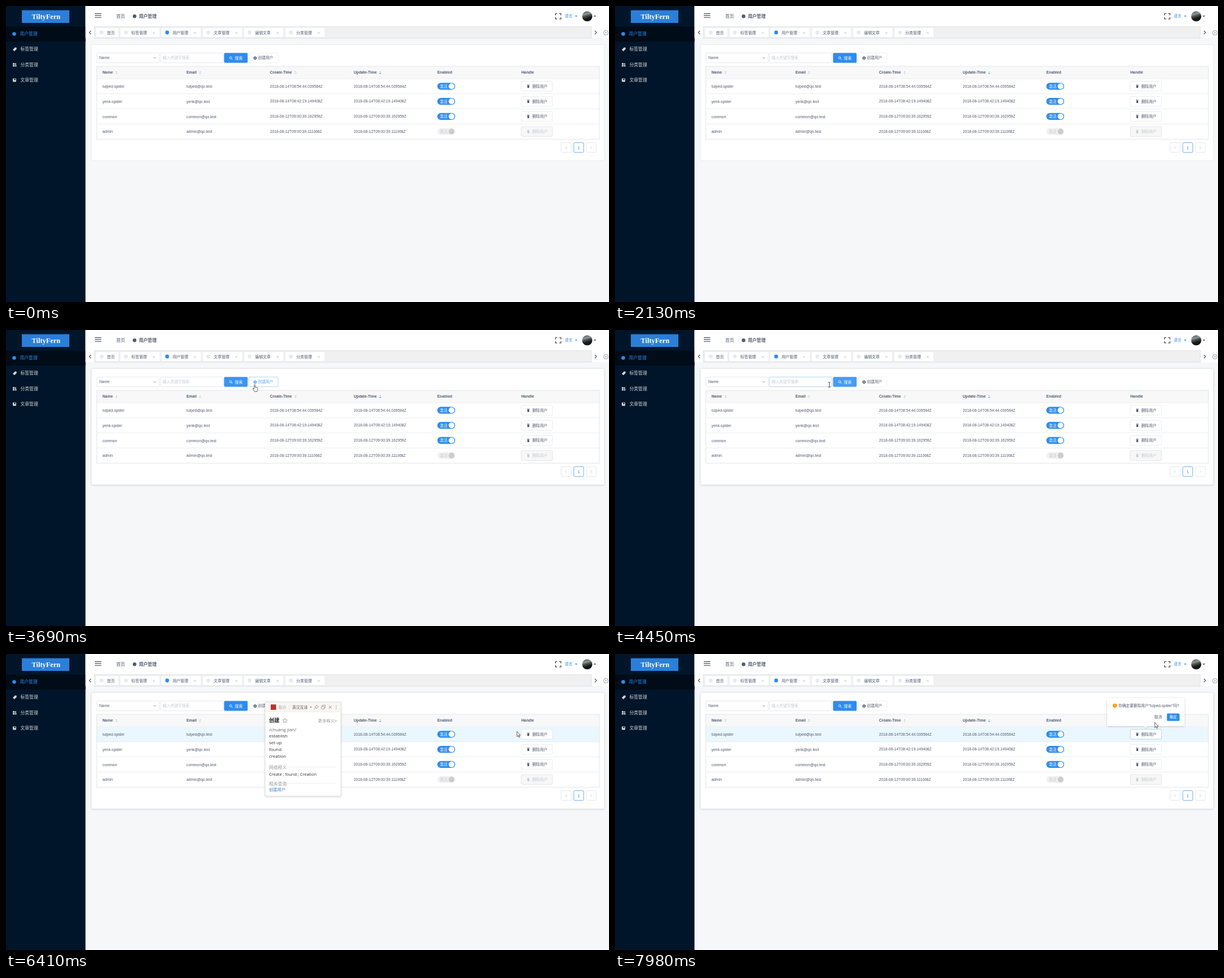
Write an HTML page that moves like this. It is 1066 px wide and 525 px high and loops after 8 s.

```html
<!DOCTYPE html>
<html lang="zh-CN">
<head>
<meta charset="utf-8">
<title>用户管理</title>
<style>
html, body { margin: 0; width: 100%; height: 100%; overflow: hidden; background: #f5f7f9; }
svg { display: block; font-family: "Liberation Sans", "Noto Sans CJK SC", "Noto Sans CJK", sans-serif; }
text { white-space: pre; }
.latin { font-family: "Open Sans", "Noto Sans CJK SC", "Noto Sans CJK", sans-serif; }
</style>
</head>
<body>
<svg id="stage" width="1066" height="525" viewBox="0 0 1066 525"></svg>
<script>
const LOOP = 8000;
const BLUE = '#2d8cf0', INK = '#515a6e', PALE = '#c5c8ce', LINE = '#e3e5e9';
const stage = document.getElementById('stage');

// Drawing helpers: text is placed by its vertical centre.
const text = (x, y, s, size = 6.75, fill = INK, more = '') =>
  `<text x="${x}" y="${y + size * .36}" font-size="${size}" fill="${fill}" ${more}>${s}</text>`;
const box = (x, y, w, h, fill, more = '') =>
  `<rect x="${x}" y="${y}" width="${w}" height="${h}" fill="${fill}" ${more}/>`;
const dot = (x, y, r, fill, more = '') => `<circle cx="${x}" cy="${y}" r="${r}" fill="${fill}" ${more}/>`;
const line = (d, color, w = .8) => `<path d="${d}" fill="none" stroke="${color}" stroke-width="${w}"/>`;
const shape = (d, fill, more = '') => `<path d="${d}" fill="${fill}" ${more}/>`;
const cross = (x, y, r, color, w = .6) =>
  line(`M${x - r} ${y - r}l${2 * r} ${2 * r}m0 ${-2 * r}l${-2 * r} ${2 * r}`, color, w);
const caret = (x, y, r, fill, dir = 1) => shape(`M${x - r} ${y}h${2 * r}l${-r} ${r * dir}z`, fill);
const frame = (x, y, w, h, color, more = '') =>
  box(x, y, w, h, '#fff', `rx="1.8" stroke="${color}" stroke-width=".7" ${more}`);
const BOLD = 'font-weight="bold"';

// Pointer moves: start, end, steps, then evenly timed way points.
const moves = [
  [70, 320, 5, 1032, 545, 808, 424],
  [550, 1100, 8, 808, 424, 640, 325, 450, 215, 340, 145, 280, 116],
  [1170, 1250, 2, 280, 116, 268, 135],
  [1570, 1800, 4, 268, 135, 190, 132, 110, 128, 35, 124, -30, 120],
  [1960, 2130, 3, -20, 20, 3, 17, 20, 6, -20, 0],
  [2590, 3060, 7, 81, 20, 380, 108],
  [3140, 3370, 4, 380, 108, 412, 106, 415, 104],
  [3440, 3760, 5, 415, 104, 430, 98, 446, 95.5],
  [3930, 3930, 1, 446, 95.5, 450, 95],
  [4160, 4450, 5, 450, 95, 379, 97],
  [4550, 4920, 6, 379, 97, 371, 96, 402, 97, 443, 96.5],
  [5010, 5170, 3, 443, 96.5, 449.5, 95.5],
  [5930, 6410, 7, 449.5, 95.5, 600, 128, 903, 137],
  [6490, 6730, 4, 903, 137, 925, 140],
  [6810, 7510, 10, 925, 140, 930, 141, 934, 138, 938, 126],
  [7910, 7980, 2, 938, 126, 954, 121]
];

function pointer(t) {
  let at = [-99, -99];
  for (const [start, end, steps, ...pts] of moves) {
    if (t < start) break;
    const k = Math.min(steps, 1 + Math.floor((t - start) / (end - start || 1) * (steps - 1) + .25));
    const legs = pts.length / 2 - 1, f = k / steps * legs;
    const i = Math.min(legs - 1, Math.floor(f)), u = f - i;
    at = [0, 1].map(a => pts[2 * i + a] * (1 - u) + pts[2 * i + 2 + a] * u);
  }
  return at;
}

const inside = ([px, py], [x, y, w, h]) => px >= x && px < x + w && py >= y && py < y + h;
// Hover strength from 0 to 1, fading over the last moments.
const lit = (t, area) => [0, 70, 140].reduce((n, d) => n + inside(pointer(t - d), area), 0) / 3;

const CARD = [151, 68.5, 907, 206], INPUT = [273, 83.3, 110.5, 17.4],
      SEARCH = [385.5, 83.3, 41.7, 17.4], CREATE = [429.3, 83.3, 51.7, 17.4];
const rowTop = i => 129 + 26.75 * i;
const removeArea = i => [911, rowTop(i) + 4.6, 55, 17.4];

const users = [
  ['tulped-spider', 'tulped@qo.test', '2018-08-14T08:54:44.039584Z'],
  ['yenk-spider', 'yenk@qo.test', '2018-08-14T08:42:19.149408Z'],
  ['common', 'common@qo.test', '2018-08-12T09:00:39.162959Z'],
  ['admin', 'admin@qo.test', '2018-08-12T09:00:39.111068Z']
];

function sidebar(t) {
  let s = box(0, 0, 140.5, 525, '#001529') + box(0, 36.5, 140.5, 26.5, '#000c17')
    + box(28, 7.5, 84, 22.5, '#2b7fd8')
    + text(45.5, 19, 'TiltyFern', 12.4, '#fff', `${BOLD} style="font-family:'Liberation Serif',serif"`)
    + dot(14.5, 49.5, 3.3, BLUE) + text(24.5, 49, '用户管理', 7.8, BLUE);
  ['标签管理', '分类管理', '文章管理'].forEach((name, i) => {
    const y = 76.5 + 27.3 * i;
    const color = lit(t, [0, y - 13, 140, 27]) ? '#fff' : '#d2d7dc';
    s += text(25.5, y, name, 7.8, color);
    if (i == 0) s += shape(`M12 ${y + 1}l4-4 2.6.3.2 2.4-4 4z`, color);
    if (i == 1) s += box(12, y - 2.5, 3, 2.6, color) + box(12, y + .8, 3, 2.7, color)
      + dot(16.8, y - 1, 1.4, color) + box(15.7, y + 1, 2.8, 2.5, color);
    if (i == 2) s += box(12, y - 2.7, 6, 6, color, 'rx=".6"') + box(14.4, y - 2, 2.3, 2.4, '#001529');
  });
  return s;
}

function header() {
  let s = box(140.5, 0, 925.5, 57, '#fff')
    + line('M157 13.7h11.5M157 17.1h11.5M157 20.5h11.5', '#444b5c', 1.2)
    + text(195, 18, '首页', 7.8) + text(217.5, 18, '/', 7, '#dcdee2')
    + dot(227.3, 18.3, 3.2, INK) + text(235, 18, '用户管理', 7.8, INK, BOLD)
    + line('M971.5 16.5v-3h3M978 13.5h3v3M981 20v3h-3M974.5 23h-3v-3', '#333', 1.2)
    + text(988, 18, '语言', 6.7, BLUE) + caret(1008, 17, 2.3, BLUE) + caret(1041, 17, 2.4, INK)
    + dot(1027.5, 18.3, 9, 'url(#photo)')
    + box(156.3, 36.8, 878.4, 20.2, '#f0f0f0', 'stroke="#dedfe1" stroke-width="1"')
    + line('M150.2 44l-3 3 3 3M1041 44l3 3-3 3', '#444b5c', 1.1)
    + dot(1060.5, 47.5, 4, '#fff', `stroke="${INK}" stroke-width=".6"`) + cross(1060.5, 47.5, 1.4, INK);
  ['首页', '标签管理', '用户管理', '文章管理', '编辑文章', '分类管理'].forEach((name, i) => {
    const x = i ? 202 + 72.9 * (i - 1) : 159;
    s += box(x, 38.7, i ? 69.8 : 40, 16.8, '#fff', 'rx="1.2" stroke="#e8eaec" stroke-width=".5"')
      + dot(x + 10, 47, 3.4, i == 2 ? BLUE : '#e8eaec') + text(x + 19.5, 47.2, name, 6.95);
    if (i) s += cross(x + 59.3, 47.7, 1.8, '#a5aab4');
  });
  return s;
}

function toolbar(t) {
  const create = lit(t, CREATE) > .4 ? '#57a3f3' : INK;
  return frame(160.5, 83.3, 110.5, 17.4, '#dcdee2') + text(165, 92, 'Name')
    + line('M260.8 90.8l2.3 2.3 2.3-2.3', '#808695')
    + frame(...INPUT, lit(t, INPUT) ? '#8fbff5' : '#dcdee2') + text(277, 92, '输入关键字搜索', 6.75, PALE)
    + box(...SEARCH, BLUE, 'rx="1.8"') + box(...SEARCH, '#fff', `rx="1.8" opacity="${.2 * lit(t, SEARCH)}"`)
    + dot(397.2, 91.8, 1.9, 'none', 'stroke="#fff" stroke-width=".8"') + line('M398.5 93.2l1.9 1.9', '#fff', .9)
    + text(404.5, 92, '搜索', 7, '#fff', 'font-weight="500"')
    + frame(...CREATE, create == INK ? '#dcdee2' : create, 'stroke-dasharray="1.7 1"')
    + dot(440.3, 92.3, 2.8, create) + line('M438.8 92.3h3M440.3 90.8v3', '#fff', .7)
    + text(445.5, 92, '创建用户', 6.7, create);
}

function table(t, asking) {
  let s = box(160.5, 107, 888.5, 129.2, '#fff') + box(160.5, 107, 888.5, 22, '#f8f8f9');
  const columns = [[170.5, 'Name', 195.3], [319, 'Email', 343], [466.7, 'Create-Time', 512],
    [614.7, 'Update-Time', 661.5], [762.5, 'Enabled'], [911, 'Handle']];
  columns.forEach(([x, name, sort], i) => {
    s += text(x, 118, name, 6.75, INK, BOLD);
    if (sort) s += caret(sort, 117.4, 1.9, PALE, -1) + caret(sort, 118.9, 1.9, i == 3 ? BLUE : PALE);
  });
  users.forEach(([name, mail, time], i) => {
    const y = rowTop(i), c = y + 13.4, off = i == 3, area = removeArea(i);
    const hover = asking && !i ? 1 : lit(t, [160.5, y, 888.5, 26.75]);
    if (hover) s += box(160.5, y, 888.5, 26.75, '#ebf7ff', `opacity="${hover}"`);
    s += line(`M160.5 ${y}H1049`, '#e8eaec')
      + text(170.5, c + .3, name) + text(319, c + .3, mail)
      + text(466.7, c - .2, time, 6.72) + text(614.7, c - .2, time, 6.72)
      + box(762.5, c - 6.2, 31.5, 12.4, off ? '#f1f1f2' : BLUE, 'rx="6.2"')
      + dot(787.6, c, 5.1, off ? '#ccc' : '#fff')
      + text(767, c, '激活', 6.8, off ? PALE : '#fff', 'font-weight="500"');
    const blue = !off && lit(t, area) > .4;
    const color = off ? PALE : blue ? '#57a3f3' : INK;
    const edge = blue || asking && !i ? '#8fc1f6' : '#e0e2e6';
    s += frame(...area, edge, blue ? 'stroke-dasharray="1.7 1"' : '');
    if (off) s += box(...area, '#f7f7f7', `rx="1.8" stroke="${edge}" stroke-width=".7"`);
    s += box(921.6, c - 1.5, 3.4, 4.3, color, 'rx=".4"') + box(921, c - 2.8, 4.6, .9, color)
      + text(930.3, c, '删除用户', 6.75, color);
  });
  return s + box(160.5, 107, 888.5, 129.2, 'none', 'stroke="#dcdee2" stroke-width=".8"');
}

const pager = () =>
  frame(981.4, 242.4, 17.4, 17.4, '#dcdee2') + frame(1003.8, 242.4, 17.4, 17.4, BLUE)
  + frame(1026, 242.4, 17.4, 17.4, '#dcdee2') + line('M991.2 249l-2 2.2 2 2.2M1033.6 249l2 2.2-2 2.2', '#b5b9c1', .7)
  + text(1010.4, 251, '1', 7.6, BLUE);

function dictionary(full) {
  const top = full ? 85.5 : 102;
  const words = ['/chuàng jiàn/', 'establish', 'set up', 'found', 'creation'];
  let s = box(458, top, 134, 252 - top, '#fff', 'stroke="#d4d4d4" stroke-width=".7" filter="url(#soft)"');
  if (full) s += box(458.3, 85.8, 133.4, 16.7, '#f8f6f2') + line('M458 102.6h134', '#e9e6e0', .6)
    + box(468, 89.5, 9.5, 9.5, '#b8322c') + text(482, 94.3, '取词', 6.4, '#aaa')
    + line('M500.5 91v7', '#e2dfd8', .6) + text(506, 94.3, '英汉互译', 6.8, '#555')
    + caret(538.8, 93.6, 2, '#777')
    + line('M544.5 98l2.8-2.8M545.5 93.2l4 4M546.5 94l2.6-3.2 3 3-3.2 2.6', '#888', .8)
    + line('M557.8 92.7h4.8v4.8h-4.8zM559.6 92.5v-1.8h4.8v4.8h-1.6', '#888', .7)
    + cross(573.2, 94.3, 2.6, '#777', .8)
    + [91.8, 94.3, 96.8].map(y => dot(583.6, y, .6, '#777')).join('');
  s += text(465, 118, '创建', 9.2, '#222', BOLD)
    + line('M493 113.7l1.2 2.9 3.1.2-2.4 2 .8 3-2.7-1.6-2.7 1.6.8-3-2.4-2 3.1-.2z', '#888', .7)
    + text(551.5, 118, '更多释义»', 7.4, '#999')
    + words.map((w, i) => text(465, 133.7 + 11.8 * i, w, 7.9, i ? '#333' : '#666', 'class="latin"')).join('')
    + text(465, 201.3, '网络释义', 7.8, '#999') + line('M499 200.5h85', '#e5e5e5', .6)
    + text(465, 213.3, 'Create ; found ; Creation', 7.4, '#333', 'class="latin"')
    + text(465, 230, '相关查询', 7.8, '#999') + line('M499 229.3h85', '#e5e5e5', .6)
    + text(465, 240, '创建用户', 7.3, '#3a84c4');
  return s;
}

const confirmBox = alpha => `<g opacity="${alpha}">`
  + shape('M872 78h133a2 2 0 0 1 2 2v46a2 2 0 0 1-2 2h-64l-3 3-3-3h-63a2 2 0 0 1-2-2v-46a2 2 0 0 1 2-2z', '#fff', 'filter="url(#soft)"')
  + dot(883.6, 91.6, 3.7, '#f90') + line('M883.6 89.5v2.6M883.6 92.9v.9', '#ffe0a8', .7)
  + text(890, 91.3, `你确定要删除用户"${users[0][0]}"吗?`, 6.7)
  + text(953.5, 112, '取消', 6.7)
  + box(975.7, 105.4, 22.3, 13.4, BLUE, 'rx="1.6"') + text(980.2, 112, '确定', 6.7, '#fff') + '</g>';

function cursor(t) {
  const p = pointer(t);
  const move = `transform="translate(${p})" stroke="#222" stroke-width=".7"`;
  if (inside(p, INPUT))
    return `<g ${move}>${line('M-2-4.2h1.4l.6.6.6-.6h1.4M0-3.6v7.2M-2 4.2h1.4l.6-.6.6.6h1.4', '#222', .9)}</g>`;
  if ([SEARCH, CREATE, removeArea(0)].some(a => inside(p, a)))
    return shape('M-.9 8V1a.9.9 0 0 1 1.8 0V5l1.3.2 1.3.3 1.3.4q.7.3.7 1.2l-.5 3.2-.7 1.4v1h-4.6L-2 9.9-3.3 7.6q.6-1 1.5-.2Z', '#fff', move);
  return shape('M.3.3V9.6L2.4 7.6 3.8 10.8 5.2 10.2 3.8 7H6.5Z', '#fff', move);
}

const defs = `<defs>
<filter id="soft" x="-10%" y="-10%" width="120%" height="125%"><feDropShadow dx="0" dy=".6" stdDeviation="1.6" flood-opacity=".22"/></filter>
<linearGradient id="photo" x2=".3" y2="1"><stop stop-color="#3b4650"/><stop offset=".35" stop-color="#8d999c"/>
<stop offset=".55" stop-color="#4b4e42"/><stop offset=".8" stop-color="#14181c"/></linearGradient></defs>`;

function scene(t) {
  const shade = lit(t, CARD), asking = t >= 7120;
  let s = defs + box(0, 0, 1066, 525, '#f5f7f9') + sidebar(t) + header();
  if (shade) s += box(...CARD, '#fff', `rx="2.2" filter="url(#soft)" opacity="${shade}"`);
  s += frame(...CARD, LINE) + toolbar(t) + table(t, asking) + pager();
  if (t >= 5790 && t < 6570) s += dictionary(t >= 5930);
  if (asking) s += confirmBox(Math.min(1, (t - 7050) / 200));
  return s + cursor(t);
}

let shown = '';
function tick() {
  const next = scene(performance.now() % LOOP);
  if (next != shown) stage.innerHTML = shown = next;
  requestAnimationFrame(tick);
}
tick();
</script>
</body>
</html>
```
